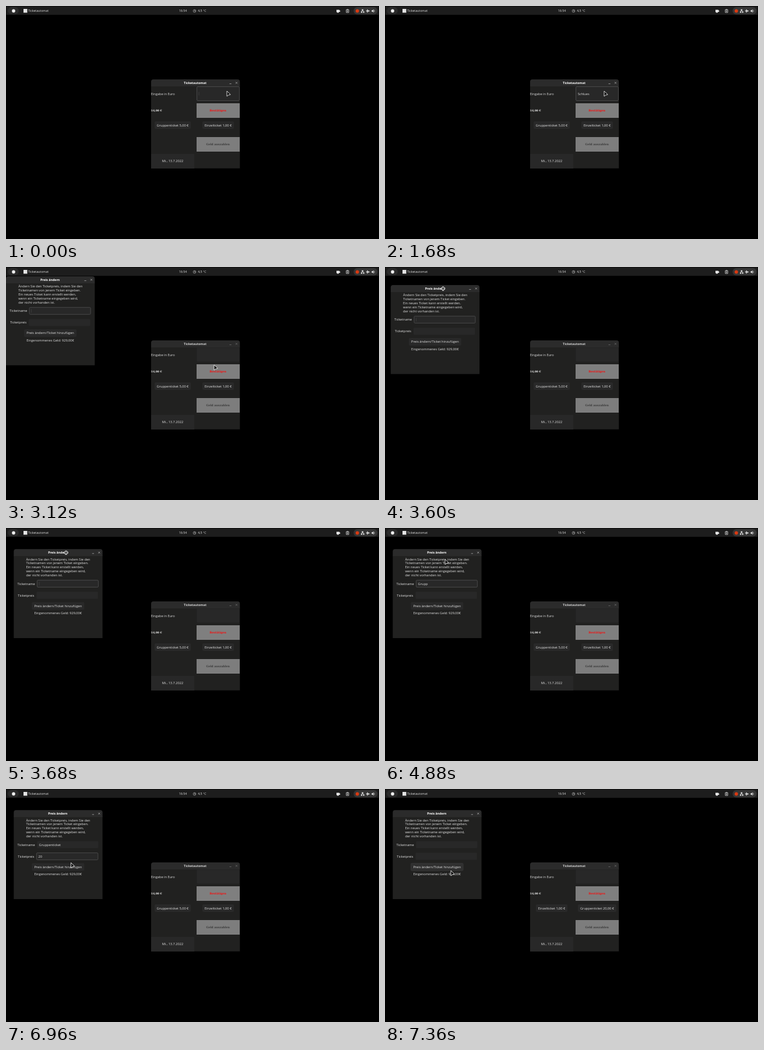
These frames come from a looping animation (640x400 px, 7440 ms). An HTML page:

```html
<!DOCTYPE html>
<html lang="de">
<head>
<meta charset="utf-8">
<title>Ticketautomat</title>
<style>
  html, body { margin: 0; width: 100%; height: 100%; overflow: hidden; background: #000; }
  svg { display: block; width: 640px; height: 400px; }
  text { font: 5.65px "Open Sans", "Noto Sans", sans-serif; fill: #e2e2e2; white-space: pre; }
  .mid { text-anchor: middle; }
  .bar { font-size: 5.25px; }
  .title { font-size: 5.3px; font-weight: 700; fill: #fff; text-anchor: middle; }
  .back .title { fill: #d2d2d2; }
  .bold { font: 700 4.75px "DejaVu Serif", serif; }
  .head { fill: #2b2b2b; }
  .body { fill: #212120; }
  .field { fill: #282828; }
  .field.focus { stroke: #484848; }
  .btn { fill: #292929; }
  .btn.hover { fill: #303030; stroke: #3a3a3a; stroke-width: .6; }
  .line { fill: none; stroke: #ddd; stroke-width: .8; }
  .controls { fill: none; stroke: #bbb; stroke-width: .7; }
  .back .controls { stroke: #777; }
  .caret { stroke: #4a4a4a; stroke-width: .6; }
</style>
</head>
<body>
<svg viewBox="0 0 640 400">
  <defs>
    <g id="frame">
      <path class="body" d="M0 11H152.3V152.8H0Z"/>
      <path class="head" d="M0 12V4Q0 0 4 0H148.3Q152.3 0 152.3 4V12Z"/>
    </g>
    <path id="controls" d="M134.5 7.5h3.2M145 4.4l3 3m0-3l-3 3"/>
  </defs>
  <rect width="640" height="400"/>

  <g id="panel">
    <rect x=".6" y=".6" width="638.8" height="14.6" fill="#1d1d1d"/>
    <rect x="3" y="2" width="19" height="12" rx="6" fill="#2b2b2b"/>
    <circle cx="13" cy="8.4" r="2.8" fill="#eee"/>
    <rect x="30" y="5" width="6.5" height="6.5" fill="#e4e4e4"/>
    <text class="bar" x="38" y="10.3">Ticketautomat</text>
    <text class="bar" x="296.8" y="10.3">16:54</text>
    <circle class="line" cx="323.5" cy="8.5" r="2.3" style="stroke:#aaa"/>
    <path class="line" d="M323.5 7v1.6h1.6" style="stroke:#aaa"/>
    <text class="bar" x="329.3" y="10.3">4,5 °C</text>
    <path d="M567 6.5h5v1h1.3v2.6h-1.6l-1 1.3h-2.2l-1.5-1.5z" fill="#e8e8e8"/>
    <path class="line" d="M583.9 6.2h4.2v5h-4.2zM585 6h2M585 8h2M585 9.5h2"/>
    <rect x="596.5" y="2" width="41" height="12.5" rx="6.2" fill="#363636"/>
    <circle cx="602.8" cy="8.5" r="2.9" fill="#d93a12"/>
    <path d="M610.5 5.7h2.6v2h-2.6zM609 9.4h2.2v2H609zM612.6 9.4h2.2v2h-2.2z" fill="#eee"/>
    <path class="line" d="M611.8 7.5v1.2M610.1 9.7v-1h3.6v1" style="stroke-width:.6"/>
    <path d="M618 7l.9 1h1.4l-1-2.3h.9l1.9 2.3h1.8q.8.5 0 1h-1.8l-1.9 2.3h-.9l1-2.3h-1.4l-.9 1z" fill="#eee"/>
    <path d="M627.3 7.4h1.4l1.8-1.7v5.6l-1.8-1.7h-1.4z" fill="#eee"/>
    <path class="line" d="M631.6 6.6q1.6 1.9 0 3.8"/>
  </g>

  <g id="shop" transform="translate(249 126)">
    <use href="#frame"/>
    <use class="controls" href="#controls"/>
    <text class="title" x="75.6" y="8">Ticketautomat</text>
    <text x="-.3" y="26.7">Eingabe in Euro</text>
    <g id="amount"></g>
    <text class="bold" x="-.2" y="55.4" style="font-size:4.5px;fill:#eee">14,00 €</text>
    <rect x="78" y="41" width="74" height="25" fill="#7f7f7f"/>
    <text class="bold mid" x="114.7" y="55.3" style="fill:#f41010">Bestätigen</text>
    <rect id="leftBox" class="btn" y="72" height="13" rx="2"/>
    <text id="left" class="mid" x="37" y="80.5"></text>
    <rect id="rightBox" class="btn" y="72" height="13" rx="2"/>
    <text id="right" class="mid" x="115" y="80.5"></text>
    <rect x="78" y="99" width="74" height="25" fill="#7d7d7d"/>
    <text class="bold mid" x="114.7" y="113.2" style="fill:#3a3a3a">Geld auszahlen</text>
    <rect class="field" y="128" width="74" height="25"/>
    <text class="mid" x="37" y="142.4">Mi., 13.7.2022</text>
  </g>

  <g id="admin">
    <use href="#frame"/>
    <use class="controls" href="#controls"/>
    <text class="title" x="75.6" y="8.2">Preis ändern</text>
    <g id="hint"></g>
    <text x="6.2" y="61.4">Ticketname</text>
    <g id="name"></g>
    <text x="7" y="81.4">Ticketpreis</text>
    <g id="price"></g>
    <rect id="save" class="btn" x="31" y="91" width="90" height="13" rx="2"/>
    <text class="mid" x="76" y="99.4">Preis ändern/Ticket hinzufügen</text>
    <text class="mid" x="76" y="111.7">Eingenommenes Geld: 929,00€</text>
  </g>

  <g id="pointer">
    <path id="arrow" d="M0 0V9L2.5 7L6.2 6Z" fill="#0c0c0c" stroke="#fff" stroke-width=".8" stroke-linejoin="round"/>
    <g id="grab" fill="none">
      <path d="M-3.6 0H3.6M0-3.6V3.6" stroke="#fff" stroke-width="3"/>
      <path d="M-3 0H3M0-3V3" stroke="#000" stroke-width="1.1"/>
    </g>
  </g>
</svg>
<script>
const LOOP = 7440, STEP = 80;
const OPEN = 3040, DRAG = 3440, DROP = 3680, SAVE = 7200;
const $ = id => document.getElementById(id);
const show = (el, on) => { el.style.display = on ? '' : 'none'; };

// [time, x, y]
const pointerPath = [
  [0, 379, 146], [1360, 379, 146], [1680, 376, 146], [2560, 376, 146],
  [2960, 361, 173], [3120, 357, 168], [DRAG, 90, 22], [DROP, 103, 42.3],
  [3760, 103, 42.3], [4160, 103, 53.6], [6480, 103, 53.6], [7120, 113, 140]
];
const windowPath = [[DRAG, 0, 16], [DROP, 13.3, 36.3]];

const amountKeys = [560, 880, 1120, 1360, 1440, 1600, 1680, 1840, 1920, 2080];
const nameKeys = [4160, 4320, 4560, 4800, 4880, 5040, 5120, 5280, 5360, 5440, 5520, 5520, 5520];
const priceKeys = [6160, 6240];

function along(path, t) {
  const i = path.findIndex(p => p[0] > t);
  if (i === 0) return path[0].slice(1);
  if (i < 0) return path[path.length - 1].slice(1);
  const [t0, x0, y0] = path[i - 1], [t1, x1, y1] = path[i];
  const u = (t - t0) / (t1 - t0), k = u * u * (3 - 2 * u);
  return [x0 + (x1 - x0) * k, y0 + (y1 - y0) * k];
}

const typed = (word, keys, t) => word.slice(0, keys.filter(k => k <= t).length);

function makeField(id, x, y, w, h) {
  const mid = y + h / 2;
  $(id).innerHTML =
    `<rect class="field" x="${x + .5}" y="${y + .5}" width="${w - 1}" height="${h - 1}" rx="1.5"/>` +
    `<path class="caret" d="M${x + 4} ${mid - 3}v6"/>` +
    `<text x="${x + 3.7}" y="${mid + 2}"></text>`;
  const [box, caret, text] = $(id).children;
  return (value, focus) => {
    box.classList.toggle('focus', focus);
    show(caret, focus && !value);
    text.textContent = value;
  };
}

function setButton(id, label, center, width) {
  $(id).textContent = label;
  $(id + 'Box').setAttribute('x', center - width / 2);
  $(id + 'Box').setAttribute('width', width);
}

function place(id, [x, y]) {
  $(id).setAttribute('transform', `translate(${x.toFixed(2)} ${y.toFixed(2)})`);
}

const setAmount = makeField('amount', 78, 12, 74, 25);
const setName = makeField('name', 39.6, 52.8, 106, 13);
const setPrice = makeField('price', 38.6, 72.8, 106.4, 13);

$('hint').innerHTML = [
  'Ändern Sie den Ticketpreis, indem Sie den',
  'Ticketnamen von jenem Ticket eingeben.',
  'Ein neues Ticket kann erstellt werden,',
  'wenn ein Ticketname eingegeben wird,',
  'der nicht vorhanden ist.'
].map((s, i) => `<text x="21.2" y="${19.3 + i * 6.9}">${s}</text>`).join('');

function render(t) {
  const open = t >= OPEN, saved = t >= SAVE, dragging = t >= DRAG && t < 3760;

  $('shop').classList.toggle('back', open);
  setAmount(open ? '' : typed('Schluessel', amountKeys, t), t < 2880);
  if (saved) {
    setButton('left', 'Einzelticket 1,00 €', 37, 54);
    setButton('right', 'Gruppenticket 20,00 €', 115, 66);
  } else {
    setButton('left', 'Gruppenticket 5,00 €', 37, 62);
    setButton('right', 'Einzelticket 1,00 €', 115, 54);
  }

  show($('admin'), open);
  place('admin', along(windowPath, t));
  setName(saved ? '' : typed('Gruppenticket', nameKeys, t), open && t < 5760);
  setPrice(saved ? '' : typed('20', priceKeys, t), open && t >= 5760 && t < 7120);
  $('save').classList.toggle('hover', t >= 7040);

  place('pointer', along(pointerPath, t));
  show($('arrow'), !dragging);
  show($('grab'), dragging);
}

function tick() {
  const t = performance.now() % LOOP;
  render(Math.floor(t / STEP) * STEP);
  requestAnimationFrame(tick);
}
tick();
</script>
</body>
</html>
```
